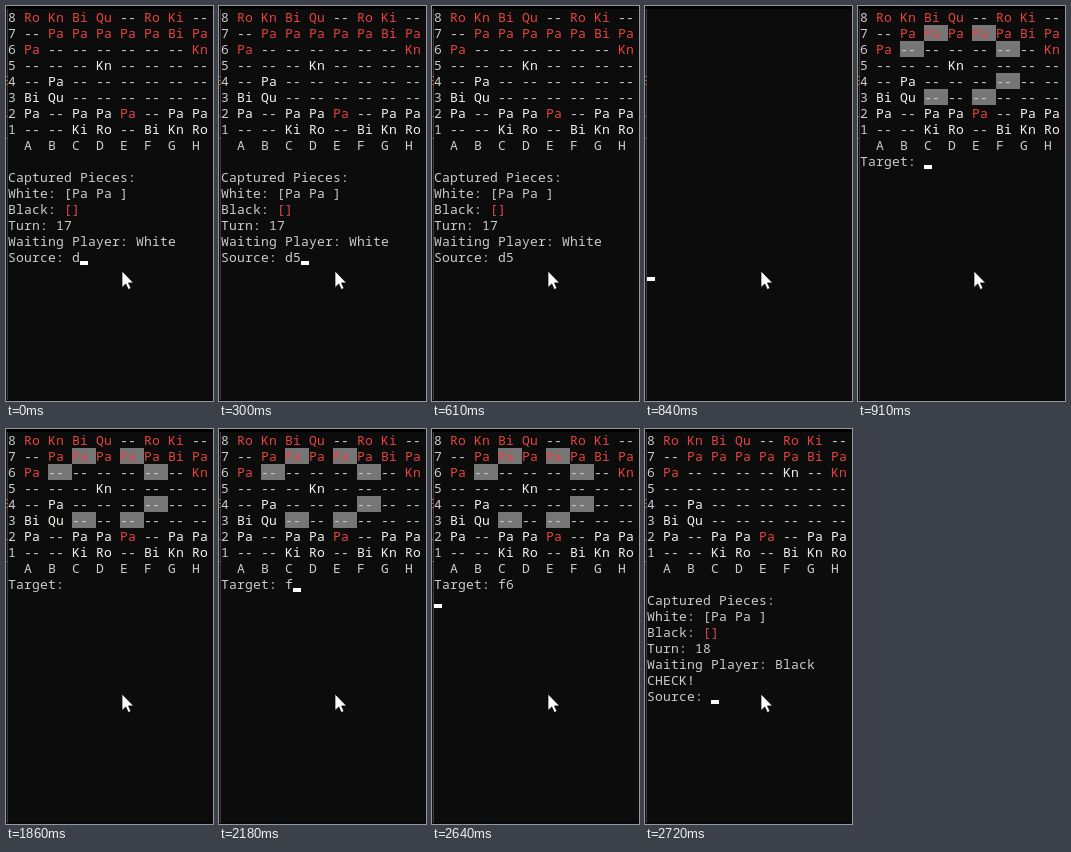
Animation, 207 px wide and 395 px high, one loop 3.57 s. Source, as an HTML page:

```html
<!DOCTYPE html>
<html lang="en">
<head>
<meta charset="utf-8">
<title>Console chess</title>
<style>
  html, body { margin: 0; width: 100%; height: 100%; overflow: hidden; background: #0c0c0c; }
  svg { display: block; width: 207px; height: 395px; }
  text {
    font: 13px "Noto Sans Mono", "DejaVu Sans Mono", monospace;
    letter-spacing: 0.2px;
    white-space: pre;
  }
</style>
</head>
<body>
<svg viewBox="0 0 207 395" xmlns="http://www.w3.org/2000/svg">
  <rect width="207" height="395" fill="#0c0c0c"/>
  <rect width="207" height="3" fill="#000"/>
  <rect y="3" width="1" height="392" fill="#101010"/>
  <rect x="1" y="3" width="1" height="392" fill="#3c3c3c"/>
  <path d="M0 70.5h2M0 74.5h2M0 78.5h2" stroke="#a8552f"/>
  <path d="M0 110.5h2M0 132.5h2" stroke="#555"/>
  <rect y="394" width="207" height="1" fill="#050505"/>
  <g id="screen"></g>
  <rect id="caret" width="8" height="4" fill="#fff"/>
  <path d="M116 265v16.5l3.8-3.6 2.5 5.6 2.7-1.2-2.5-5.4h5z" fill="#fff" stroke="#000" stroke-width=".7"/>
</svg>
<script>
const NS = "http://www.w3.org/2000/svg";
const CELL_W = 8, CELL_H = 16, LEFT = 2, TOP = 3;
const GREY = "#cccccc", WHITE = "#f4f2ee", RED = "#e7433f", PINK = "#dc4858", MARK = "#767676";
const LOOP = 3570;

// Lower-case pieces are black's, shown in red.
const before = [
  "ro kn bi qu -- ro ki --",
  "-- pa pa pa pa pa bi pa",
  "pa -- -- -- -- -- -- kn",
  "-- -- -- Kn -- -- -- --",
  "-- Pa -- -- -- -- -- --",
  "Bi Qu -- -- -- -- -- --",
  "Pa -- Pa Pa pa -- Pa Pa",
  "-- -- Ki Ro -- Bi Kn Ro"
];
const after = before.slice();
after[2] = "pa -- -- -- -- Kn -- kn";
after[3] = "-- -- -- -- -- -- -- --";
const moves = ["c7", "e7", "b6", "f6", "f4", "c3", "e3"];

const screen = document.getElementById("screen");
const caret = document.getElementById("caret");

function add(parent, tag, attrs) {
  const node = document.createElementNS(NS, tag);
  for (const key in attrs) node.setAttribute(key, attrs[key]);
  return parent.appendChild(node);
}

function print(parent, col, row, string, fill = GREY) {
  const x = LEFT + col * CELL_W, y = TOP + row * CELL_H + 13;
  const node = add(parent, "text", { x, y, fill });
  node.textContent = string;
  return node;
}

function drawBoard(parent, rows, marked = []) {
  for (const square of marked) {
    const file = square.charCodeAt(0) - 97, row = 8 - square[1];
    add(parent, "rect", {
      x: LEFT + (2 + 3 * file) * CELL_W, y: TOP + row * CELL_H,
      width: 3 * CELL_W, height: CELL_H, fill: MARK
    });
  }
  rows.forEach((line, row) => {
    print(parent, 0, row, 8 - row);
    line.split(" ").forEach((piece, file) => {
      const fill = piece === "--" ? GREY : piece === piece.toLowerCase() ? RED : WHITE;
      print(parent, 2 + 3 * file, row, piece[0].toUpperCase() + piece[1], fill);
    });
  });
  [..."ABCDEFGH"].forEach((name, file) => print(parent, 2 + 3 * file, 8, name));
}

function drawStatus(parent, turn, player) {
  print(parent, 0, 10, "Captured Pieces:");
  print(parent, 0, 11, "White: [Pa Pa ]");
  print(parent, 0, 12, "Black:");
  print(parent, 7, 12, "[]", PINK);
  print(parent, 0, 13, "Turn: " + turn);
  print(parent, 0, 14, "Waiting Player: " + player);
}

function makeView(draw) {
  const group = add(screen, "g", {});
  draw(group);
  return group;
}

const views = {
  source: makeView(g => {
    drawBoard(g, before);
    drawStatus(g, 17, "White");
    print(g, 0, 15, "Source:");
  }),
  target: makeView(g => {
    drawBoard(g, before, moves);
    print(g, 0, 9, "Target:");
  }),
  check: makeView(g => {
    drawBoard(g, after);
    drawStatus(g, 18, "Black");
    print(g, 0, 15, "CHECK!");
    print(g, 0, 16, "Source:");
  })
};
const typed = {
  source: print(views.source, 8, 15, ""),
  target: print(views.target, 8, 9, "")
};

// Start time, view, typed text, caret [column, row] or none.
const steps = [
  [0, "source", "d", [9, 15]],
  [70, "source", "d"],
  [300, "source", "d5", [10, 15]],
  [610, "source", "d5"],
  [840, "blank", "", [0, 16]],
  [910, "target", "", [8, 9]],
  [1860, "target", ""],
  [2180, "target", "f", [9, 9]],
  [2490, "target", "f6", [10, 9]],
  [2640, "target", "f6", [0, 10]],
  [2720, "check", "", [8, 16]]
];

function render(time) {
  const [, view, input, at] = steps.findLast(step => step[0] <= time);
  for (const name in views) views[name].style.display = name === view ? "" : "none";
  if (typed[view]) typed[view].textContent = input;
  caret.style.display = at ? "" : "none";
  if (at) {
    caret.setAttribute("x", LEFT + at[0] * CELL_W);
    caret.setAttribute("y", TOP + (at[1] + 1) * CELL_H - 4);
  }
}

const start = performance.now();
function tick() {
  render((performance.now() - start) % LOOP);
  requestAnimationFrame(tick);
}
tick();
</script>
</body>
</html>
```
